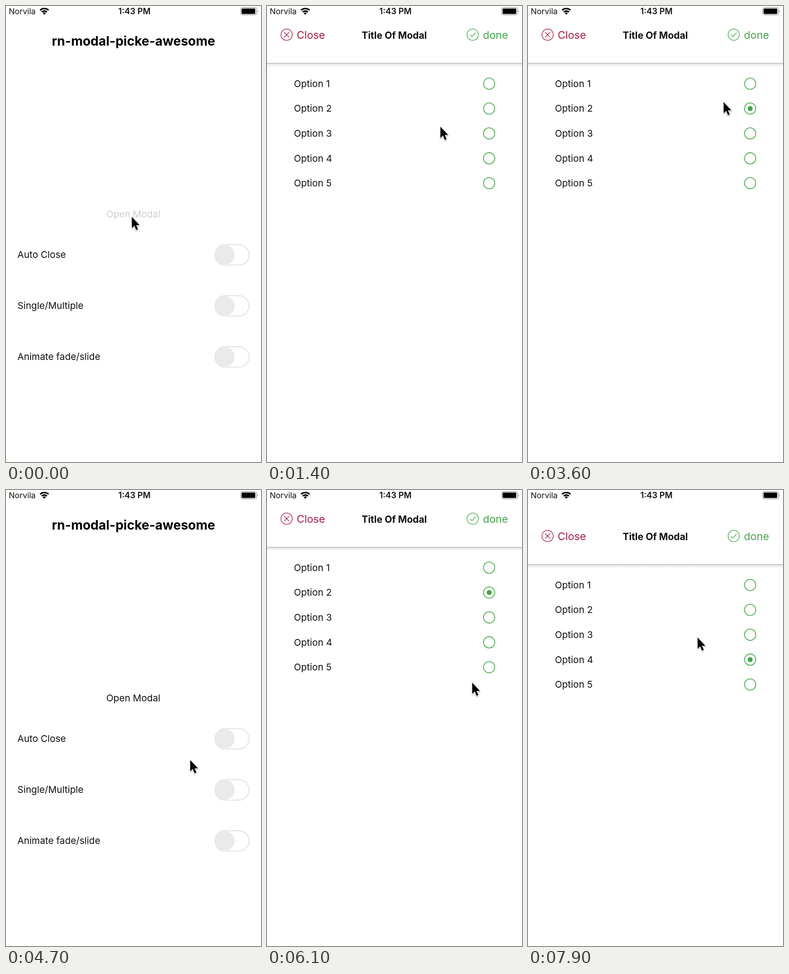
An HTML page that plays this animation: 559 px wide and 1001 px high, repeating every 8000 ms.

```html
<!DOCTYPE html>
<html lang="en">
<head>
<meta charset="utf-8">
<title>Modal picker</title>
<style>
  html, body { margin: 0; width: 100%; height: 100%; overflow: hidden; background: #fff; }
  svg { display: block; width: 100vw; height: 100vh; }
  text { font: 20.6px Inter, Roboto, sans-serif; fill: #111; }
  .middle { text-anchor: middle; }
  .action { font-size: 23.2px; }
  .red text { fill: #a91d42; }
  .green text { fill: #43a647; }
  .icon { fill: none; stroke-width: 1.5; stroke-linecap: round; stroke-linejoin: round; }
  .red .icon { stroke: #b3274a; }
  .green .icon { stroke: #4bae50; }
</style>
</head>
<body>
<svg viewBox="0 0 559 1001">
  <defs>
    <linearGradient id="fade" x2="0" y2="1">
      <stop stop-color="#000" stop-opacity=".1"/>
      <stop offset="1" stop-color="#000" stop-opacity="0"/>
    </linearGradient>
    <filter id="drop" x="-50%" y="-50%" width="200%" height="200%">
      <feDropShadow dx="0" dy="1.5" stdDeviation="1.3" flood-opacity=".4"/>
    </filter>
  </defs>

  <g id="home">
    <text class="middle" x="279.5" y="87" style="font-size:28px;font-weight:700;fill:#000">rn-modal-picke-awesome</text>
    <text id="open" class="middle" x="279" y="464">Open Modal</text>
  </g>

  <g id="modal">
    <rect width="559" height="1001" fill="#fff"/>
    <g class="red">
      <circle class="icon" cx="43" cy="63" r="12.4"/>
      <path class="icon" d="M37.8 57.8l10.4 10.4m0-10.4l-10.4 10.4"/>
      <text class="action" x="65" y="72">Close</text>
    </g>
    <text class="middle" x="279" y="71.5" style="font-size:20.9px;font-weight:700">Title Of Modal</text>
    <g id="done" class="green">
      <circle class="icon" cx="451" cy="63" r="12.4"/>
      <path class="icon" d="M445.5 63.5l3.8 4 7.4-8.5"/>
      <text class="action" x="473.2" y="72">done</text>
    </g>
    <rect y="126" width="559" height="9" fill="url(#fade)"/>
    <rect y="125" width="559" height="1.5" fill="#b8b8b8"/>
  </g>

  <g id="status">
    <text x="6" y="18.3" style="font-size:17.6px">Norvila</text>
    <g fill="none" stroke="#000" stroke-width="3.4">
      <path d="M74.8 9.3a13.3 13.3 0 0 1 18.4 0"/>
      <path d="M78.4 13.3a8 8 0 0 1 11.2 0"/>
    </g>
    <path d="M84 19.3l-3.4-3.6a5 5 0 0 1 6.8 0z"/>
    <text class="middle" x="281.5" y="18.3" style="font-size:18.3px;font-weight:600">1:43 PM</text>
    <rect x="514.5" y="3.5" width="35" height="16" rx="4" fill="none" stroke="#777"/>
    <rect x="516.5" y="5.5" width="30" height="12" rx="1.8"/>
    <path d="M551 9q2.4 2.6 0 5.4z" fill="#777"/>
  </g>

  <path id="cursor" filter="url(#drop)" stroke="#fff" stroke-width="1.8" paint-order="stroke"
    d="M.8.8V25.5L6.5 20.2 10.3 29.8 14.4 28.1 10.4 18.9H17.8Z"/>
</svg>

<script>
const LOOP = 8000, STEP = 100, HEIGHT = 1001, SPRING = 16.8;
const SLIDE_DELAY = 100, HOLD = 100, RELEASE = 100, DWELL = 200, TOGGLE = 200;

// The user's session: the pointer visits each stop in turn. A tap is the
// number of an option or the name of a control.
const stops = [
  { at: -89, x: 275, y: 462, tap: "open" },
  { at: 600, x: 318, y: 380 },
  { at: 1900, x: 426, y: 176, tap: 1 },
  { at: 2300, x: 424, y: 245 },
  { at: 2700, x: 424, y: 257, tap: 3 },
  { at: 3400, x: 428, y: 210, tap: 2 },
  { at: 4187, x: 531, y: 66, tap: "done" },
  { at: 4700, x: 403, y: 592 },
  { at: 5200, x: 480, y: 540, tap: "auto" },
  { at: 5416, x: 284, y: 458, tap: "open" },
  { at: 6100, x: 449, y: 422 },
  { at: 6384, x: 440, y: 338, tap: 4 },
  { at: 7000, x: 387, y: 404 },
  { at: 7499, x: 282, y: 452, tap: "open" },
  { at: 7900, x: 371, y: 323 }
];

const byId = id => document.getElementById(id);
const clamp = v => Math.max(0, Math.min(1, v));
const smooth = p => p * p * (3 - 2 * p);
const isOption = stop => stop.tap > 0;
const last = (t, test) => stops.filter(stop => stop.at <= t && test(stop)).pop();

const autoClose = stops.find(stop => stop.tap === "auto");
const closes = stop => stop.tap === "done" || isOption(stop) && stop.at > autoClose.at;

function add(parent, tag, attributes, label = "") {
  const node = document.createElementNS("http://www.w3.org/2000/svg", tag);
  for (const name in attributes) node.setAttribute(name, attributes[name]);
  node.textContent = label;
  return parent.appendChild(node);
}

const switches = ["Auto Close", "Single/Multiple", "Animate fade/slide"].map((label, i) => {
  const y = 546 + i * 112, home = byId("home");
  add(home, "text", { x: 25, y: y + 7 }, label);
  return {
    track: add(home, "rect", { x: 458.2, y: y - 22, width: 74.6, height: 44.6, rx: 22.3, "stroke-width": 2.4 }),
    thumb: add(home, "circle", { cy: y + .3, r: 21.3, fill: "#eaeaea" })
  };
});

const options = [1, 2, 3, 4, 5].map(number => {
  const y = 115.9 + number * 54.6, modal = byId("modal");
  return {
    number,
    label: add(modal, "text", { x: 59, y: y + 7.3 }, "Option " + number),
    ring: add(modal, "circle", { cx: 487, cy: y, r: 12.3, fill: "none", stroke: "#4bae50", "stroke-width": 1.8 }),
    dot: add(modal, "circle", { cx: 487, cy: y, r: 5.5, fill: "#43a647" })
  };
});

function pointerAt(t) {
  const from = last(t, () => true);
  const to = stops.find(stop => stop.at > t) || from;
  const gap = to.at - from.at || 1, rest = Math.min(DWELL, gap / 2);
  const p = smooth(clamp((t - from.at - rest) / (gap - rest)));
  return [from.x + (to.x - from.x) * p, from.y + (to.y - from.y) * p];
}

// Critically damped spring, upwards on open and downwards on close
function modalOffset(t) {
  const cause = last(t - SLIDE_DELAY, stop => stop.tap === "open" || closes(stop));
  if (!cause) return HEIGHT;
  const x = SPRING * (t - SLIDE_DELAY - cause.at) / 1000;
  const remaining = (1 + x) * Math.exp(-x);
  return Math.floor(HEIGHT * (closes(cause) ? 1 - remaining : remaining));
}

// A tapped element dims, then fades back
function opacityOf(tap, t) {
  const press = last(t, stop => stop.tap === tap);
  return press ? .2 + .8 * clamp((t - press.at - HOLD) / RELEASE) : 1;
}

function render(t) {
  for (const id of ["open", "done"]) byId(id).style.opacity = opacityOf(id, t);
  byId("modal").setAttribute("transform", `translate(0 ${modalOffset(t)})`);
  byId("cursor").setAttribute("transform", `translate(${pointerAt(t)})`);

  const chosen = last(t, isOption);
  for (const { number, label, dot } of options) {
    label.style.opacity = opacityOf(number, t);
    dot.style.display = chosen && chosen.tap === number ? "" : "none";
  }

  switches.forEach(({ track, thumb }, i) => {
    const on = i ? 0 : clamp((t - autoClose.at) / TOGGLE);
    thumb.setAttribute("cx", 480 + 31 * on);
    track.setAttribute("fill", on ? "#4cd964" : "#fff");
    track.setAttribute("stroke", on ? "#4cd964" : "#e5e5e5");
  });
}

const start = performance.now();
function tick() {
  const t = (performance.now() - start) % LOOP;
  render(Math.floor(t / STEP) * STEP);
  requestAnimationFrame(tick);
}
tick();
</script>
</body>
</html>
```
